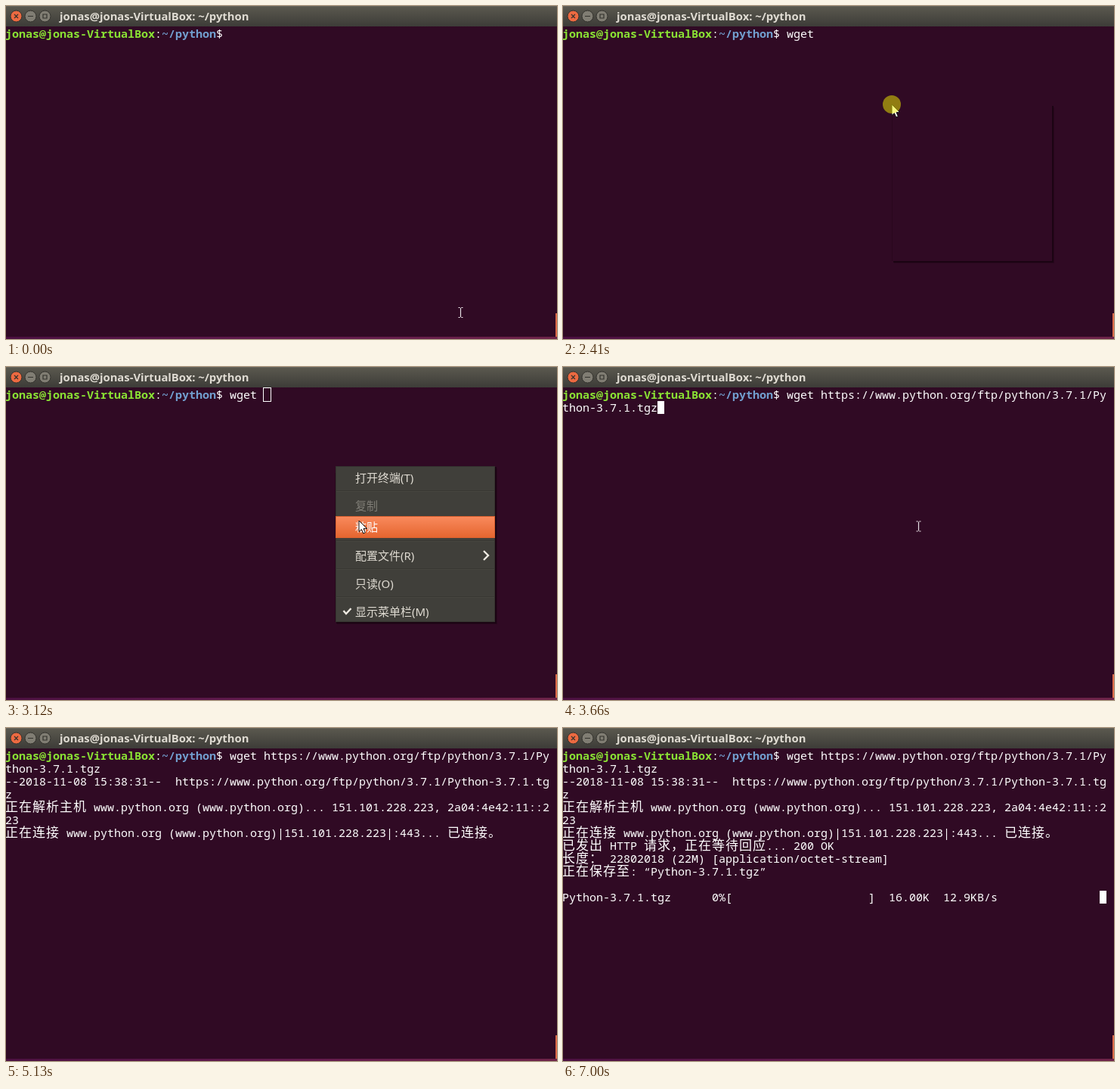
Write an HTML page that moves like this. It is 729 by 440 pixels and loops after 7320 ms.

```html
<!DOCTYPE html>
<html lang="zh">
<head>
<meta charset="utf-8">
<title>Terminal</title>
<style>
html, body { margin: 0; width: 100%; height: 100%; overflow: hidden; background: #300a24; }
svg { display: block; width: 729px; height: 440px; }
text { white-space: pre; }
.mono { font: 15px "Noto Sans Mono", "DejaVu Sans Mono", monospace; fill: #fff; }
.cjk { font: 17px "Noto Sans CJK SC", "Noto Sans CJK", sans-serif; letter-spacing: 1px; fill: #fff; }
.bold { font-weight: 700; }
.title { font: 700 14.8px "Noto Sans", "Open Sans", sans-serif; fill: #dfdbd2; }
.item { font: 15px "Noto Sans", "Noto Sans CJK SC", "Noto Sans CJK", sans-serif; fill: #dfdbd2; }
</style>
</head>
<body>
<svg viewBox="0 0 729 440">
  <defs>
    <linearGradient id="bar" x2="0" y2="1">
      <stop stop-color="#5b594f"/><stop offset="1" stop-color="#3d3c38"/>
    </linearGradient>
    <linearGradient id="hot" x2="0" y2="1">
      <stop stop-color="#f98a5d"/><stop offset="1" stop-color="#e5652f"/>
    </linearGradient>
    <linearGradient id="desk">
      <stop stop-color="#4b1040"/><stop offset=".5" stop-color="#611a4c"/><stop offset="1" stop-color="#6d2348"/>
    </linearGradient>
  </defs>
  <rect width="729" height="440" fill="#300a24"/>
  <rect y="437" width="729" height="3" fill="url(#desk)"/>
  <rect x="727" y="406" width="2" height="31" fill="#dc6a48"/>
  <rect width="729" height="27" fill="url(#bar)"/>
  <path d="M0 .5H729" stroke="#66645b"/>
  <g stroke="#33322d" fill="#807d73">
    <circle cx="13.5" cy="13.5" r="7.5" fill="#ec6a41"/>
    <circle cx="32.5" cy="13.5" r="7.5"/>
    <circle cx="51.5" cy="13.5" r="7.5"/>
    <path d="M11 11l5 5m0-5l-5 5M29 13.5h7M49 11h5v5h-5z" fill="none" stroke-width="1.2"/>
  </g>
  <text class="title" x="71" y="19">jonas@jonas-VirtualBox: ~/python</text>
  <g id="term"></g>
  <rect id="block" width="9" height="17" fill="#fff"/>
  <rect id="hollow" x="340.5" y="27.5" width="10" height="18" fill="none" stroke="#fff"/>
  <g id="shadow" fill="none" stroke="#16030f">
    <path d="M437 338H648V132" stroke-width="2" opacity=".8"/>
    <path d="M438 339.5H649.5V134M435.5 140V337" opacity=".25"/>
  </g>
  <g id="menu"></g>
  <path id="arrow" d="M0 0V14.5L3.4 11.5 5.7 16.9 8.3 15.8 6 10.6H10.6Z" fill="#fff" stroke="#111"/>
  <path id="beam" d="M-3 -6.5H-.8M.8 -6.5H3M0 -6V6M-3 6.5H-.8M.8 6.5H3" fill="none" stroke="#e6e0e4" stroke-width="1.2"/>
  <circle id="click" r="12" fill="#f2f000" opacity=".5"/>
</svg>
<script>
const LOOP = 7320, CELL = 9, ROW = 17;
const $ = id => document.getElementById(id);
const show = (el, on) => el.setAttribute('visibility', on ? 'visible' : 'hidden');
const move = (el, [x, y]) => el.setAttribute('transform', `translate(${x} ${y})`);

// Last entry of a [time, value] list that has begun
function at(steps, t) {
  let value = null;
  for (const [start, v] of steps) if (t >= start) value = v;
  return value;
}

const url = 'https://www.python.org/ftp/python/3.7.1/Python-3.7.1.tgz';
const ip = '151.101.228.223';
const host = 'www.python.org (www.python.org)';
const stamp = '--2018-11-08 15:38:31--  ';
const bar = 'Python-3.7.1.tgz' + ' '.repeat(6) + '0%[' + ' '.repeat(20) + ']';

// [time, row, column, text]
const output = [
  [770, 0, 33, 'w'], [1080, 0, 34, 'g'], [1230, 0, 35, 'e'], [1400, 0, 36, 't'],
  [3570, 0, 38, url.slice(0, 42)],
  [3570, 1, 0, url.slice(42)],
  [4500, 2, 0, stamp + url.slice(0, -1)],
  [4500, 3, 0, 'z'],
  [4500, 4, 0, `正在解析主机 ${host}... `],
  [4580, 4, 48, `${ip}, 2a04:4e42:11::2`],
  [4580, 5, 0, '23'],
  [4580, 6, 0, `正在连接 ${host}|${ip}|:443... `],
  [4670, 6, 65, '已连接。'],
  [5590, 7, 0, '已发出 HTTP 请求，正在等待回应... '],
  [5660, 7, 34, '200 OK'],
  [5660, 8, 0, '长度： 22802018 (22M) [application/octet-stream]'],
  [5660, 9, 0, '正在保存至: “Python-3.7.1.tgz”'],
  [5740, 11, 0, bar]
];
const progress = [
  [5740, '     0  --.-KB/s'], [6060, '10.93K  24.1KB/s'],
  [6530, '13.66K  15.8KB/s'], [7000, '16.00K  12.9KB/s']
];
const cursor = [
  [620, [33, 0]], [770, [34, 0]], [1080, [35, 0]], [1230, [36, 0]], [1400, [37, 0]],
  [1550, [38, 0]], [2180, null], [3570, [14, 1]], [4270, null], [4500, [48, 4]],
  [4580, [65, 6]], [4670, [0, 7]], [5130, null], [5590, [34, 7]], [5660, [0, 10]],
  [5740, [79, 11]], [6290, null], [6930, [79, 11]]
];
const beam = [
  [0, [601.5, 405]], [70, [508, 300]], [160, [441.5, 248]], [690, null],
  [2100, [441, 235]], [2180, [437, 170]], [2250, [435, 130]], [2410, null],
  [3570, [470.5, 210.5]], [4500, null],
  [6530, [603.5, 412]], [6610, [603.5, 432]], [6690, null]
];
const arrow = [
  [2410, [435, 130]], [2800, [438, 136]], [2880, [445, 150]], [2960, [454, 170]],
  [3040, [462, 190]], [3120, [467, 203]], [3200, [469, 208]], [3280, [470, 210]],
  [3570, null]
];
const click = [[2330, [435, 130]], [2480, null], [3350, [470, 210]], [3490, null]];

// Terminal text: wide glyphs take two cells
function line(row, col, text, style = '', fill = '#fff') {
  let svg = '';
  for (const run of text.match(/[\u3000-\uffef]+|[^\u3000-\uffef]+/g)) {
    const wide = run[0] >= '\u3000';
    svg += `<text class="${wide ? 'cjk' : 'mono'} ${style}" style="fill:${fill}" ` +
      `x="${col * CELL - 1}" y="${42 + row * ROW}">${run}</text>`;
    col += run.length * (wide ? 2 : 1);
  }
  return svg;
}

const prompt = line(0, 0, 'jonas@jonas-VirtualBox', 'bold', '#8ae234') + line(0, 22, ':') +
  line(0, 23, '~/python', 'bold', '#729fcf') + line(0, 31, '$');

function terminal(t) {
  let svg = prompt;
  for (const [start, row, col, text] of output) if (t >= start) svg += line(row, col, text);
  const speed = at(progress, t);
  return speed ? svg + line(11, 48, speed) : svg;
}

const items = [
  [132, '打开终端(T)'], [169, '复制'], [197, '粘贴'],
  [235, '配置文件(R)'], [272, '只读(O)'], [309, '显示菜单栏(M)']
];

function menu(hover) {
  let svg = '<rect x="436.5" y="131.5" width="210" height="205" fill="#403f3a" stroke="#35342f"/>';
  for (const y of [164, 230, 267, 304])
    svg += `<path d="M437 ${y - .5}h209" stroke="#383732"/><path d="M437 ${y + .5}h209" stroke="#474640"/>`;
  items.forEach(([y, label], i) => {
    const on = i === hover;
    if (on) svg += `<rect x="436.5" y="${y + .5}" width="210" height="28" fill="url(#hot)" stroke="#d9602f"/>`;
    const fill = on ? '#fff' : i === 1 ? '#7f7d76' : '#dfdbd2';
    svg += `<text class="item" x="462" y="${y + 20}" style="fill:${fill}">${label}</text>`;
  });
  return svg + '<g fill="none" stroke="#eeeae2" stroke-width="2.4">' +
    '<path d="M632 243l6 6-6 6"/><path d="M446.500 322l3.500 4 6.500-7"/></g>';
}

const drawn = {};
function fill(id, svg) {
  if (drawn[id] !== svg) $(id).innerHTML = drawn[id] = svg;
}

function place(id, pos) {
  show($(id), pos);
  if (pos) move($(id), pos);
}

function draw(t) {
  fill('term', terminal(t));
  const cell = at(cursor, t), tip = at(arrow, t);
  place('block', cell && [cell[0] * CELL - 1, 28 + cell[1] * ROW]);
  show($('hollow'), t >= 2480 && t < 3570);
  show($('shadow'), t >= 2410 && t < 3490);
  const open = t >= 2480 && t < 3490;
  const hover = open ? items.findIndex(([y], i) => i !== 1 && tip[1] >= y && tip[1] < y + 29) : -1;
  fill('menu', open ? menu(hover) : '');
  place('arrow', tip);
  place('beam', at(beam, t));
  place('click', at(click, t));
}

const begin = performance.now();
function tick() {
  draw((performance.now() - begin) % LOOP);
  requestAnimationFrame(tick);
}
tick();
</script>
</body>
</html>
```
